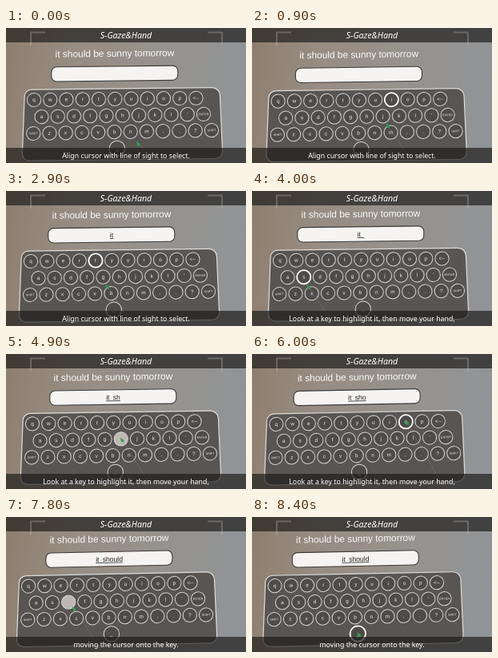
Animation, 300 px wide and 169 px high, one loop 8500 ms. Source, as an HTML page with a canvas:

```html
<!DOCTYPE html>
<html lang="en">
<head>
<meta charset="utf-8">
<title>Gaze typing</title>
<style>
  html, body { margin: 0; width: 100%; height: 100%; overflow: hidden; background: #98918a; }
  canvas { display: block; width: 100vw; height: 100vh; }
</style>
</head>
<body>
<canvas id="stage"></canvas>
<script>
const W = 300, H = 169, LOOP = 8500, STEP = 100;
const canvas = document.getElementById('stage');
const ctx = canvas.getContext('2d');
const SANS = '"Liberation Sans", Arial, sans-serif';
const CAPTION = '"Noto Sans", "Open Sans", sans-serif';

// Camera sway: time, x and y of the first key, slope
const sway = [
  [0, 35, 90, -.011], [1700, 30.7, 93, -.016], [2900, 31, 88, -.012], [4000, 35, 87, -.012],
  [6000, 30.3, 87.9, -.019], [7100, 27.6, 87, -.022], [8400, 28.5, 86.2, -.02]
];

// Typing: key, gaze start, press time
const typing = [
  ['i', 900, 1600], ['t', 2000, 2500], ['space', 3000, 3300], ['s', 3600, 4200],
  ['h', 4500, 4900], ['o', 5200, 5700], ['u', 6100, 6400], ['l', 6700, 7000],
  ['d', 7300, 7700], ['space', 8000, 8600]
];

const captions = [
  [0, 'Align cursor with line of sight to select.'],
  [3300, 'Look at a key to highlight it, then move your hand,'],
  [6400, 'moving the cursor onto the key.']
];

const keys = {};
function addRow(names, x, y, rise) {
  names.split(' ').forEach((name, i) => {
    const id = keys[name] ? name + '2' : name;
    keys[id] = { label: name, x: x + i * 20.25, y: y - i * rise };
  });
}
addRow('q w e r t y u i o p <--', 0, 0, 0);
addRow("a s d f g h j k l ' ENTER", 9.5, 21.2, .1);
addRow('SHIFT z x c v b n m , . ? SHIFT', -.8, 42, .14);
keys.space = { label: '_', x: 103.8, y: 62 };

// Cursor path in keyboard coordinates
const at = (time, name) => [time, keys[name].x + 1.2, keys[name].y + 1];
const cursorPath = [
  [0, 130, 56], [700, 136, 38], at(1500, 'i'), at(1800, 'i'), at(2400, 't'), at(2600, 't'),
  [2900, 95.5, 33], at(3300, 'space'), [3700, 50, 42], [4000, 35.5, 33.5], at(4200, 's'),
  [4500, 60, 36], at(4900, 'h'), [5300, 140, 20], at(5700, 'o'), at(6000, 'o'),
  at(6400, 'u'), [6700, 158, 34], at(7000, 'l'), at(7200, 'l'), at(7700, 'd'),
  [8000, 72, 50], at(8400, 'space')
];

function sample(track, t) {
  const next = track.findIndex(row => row[0] > t);
  if (next < 0) return track[track.length - 1].slice(1);
  const a = track[next - 1], b = track[next];
  const p = (t - a[0]) / (b[0] - a[0]);
  const eased = p * p * (3 - 2 * p);
  return a.slice(1).map((v, i) => v + (b[i + 1] - v) * eased);
}

function label(text, x, y, font, color = '#fff', align = 'center') {
  ctx.font = font;
  ctx.fillStyle = color;
  ctx.textAlign = align;
  ctx.fillText(text, x, y);
}

function shape(fill, stroke, width) {
  if (fill) { ctx.fillStyle = fill; ctx.fill(); }
  if (stroke) { ctx.strokeStyle = stroke; ctx.lineWidth = width; ctx.stroke(); }
}

function drawBackground() {
  const wall = ctx.createLinearGradient(0, 60, W, 100);
  wall.addColorStop(0, '#8f7f70');
  wall.addColorStop(.25, '#978c82');
  wall.addColorStop(.6, '#97928d');
  wall.addColorStop(1, '#909498');
  ctx.fillStyle = wall;
  ctx.fillRect(0, 0, W, H);
}

function drawField(typed) {
  label('it should be sunny tomorrow', 26.6, -53, '11.9px ' + SANS, '#fafafa', 'left');
  ctx.beginPath();
  ctx.roundRect(21.8, -41, 158, 18.3, 6.5);
  shape('#f5f4f2', '#3c3a38', 1.1);
  if (!typed) return;
  label(typed, 101, -28.6, '8.6px ' + SANS, '#222');
  const width = ctx.measureText(typed).width;
  ctx.fillRect(101 - width / 2, -27.5, width, .7);
}

function drawPanel() {
  ctx.beginPath();
  ctx.moveTo(100, -13);
  ctx.arcTo(232, -13, 236, 76, 10);
  ctx.arcTo(236, 76, -15, 76, 9);
  ctx.arcTo(-15, 76, -11.5, -13, 9);
  ctx.arcTo(-11.5, -13, 100, -13, 9);
  ctx.closePath();
  shape('#585553', '#dfddda', 1.2);
}

function drawKey(id, gazed, pressed) {
  const { label: text, x, y } = keys[id];
  ctx.beginPath();
  ctx.arc(x, y, id === 'space' ? 9.7 : 8.6, 0, Math.PI * 2);
  const bold = gazed && !pressed;
  shape(pressed ? '#bdb8b4' : '#4e4b49', bold ? '#fff' : '#d6d4d1', bold ? 1.8 : 1);
  if (pressed) return;
  const size = text.length > 3 ? 3.8 : 6.4;
  label(text, x, y + (size > 4 ? 2 : 1.3), size + 'px ' + SANS, '#f4f4f4');
}

function drawCursor(t) {
  const [x, y] = sample(cursorPath, t);
  ctx.beginPath();
  ctx.moveTo(x, y);
  ctx.lineTo(x + 12 + (76 - y) * .4, 76);
  shape(null, 'rgba(155,160,152,.45)', .6);
  ctx.beginPath();
  ctx.moveTo(x - 2.2, y - 2.8);
  ctx.lineTo(x + 2.6, y + .5);
  ctx.lineTo(x + 2, y + 3.4);
  ctx.lineTo(x - 1, y + 2.2);
  ctx.closePath();
  shape('#35a052');
}

function drawBrackets() {
  ctx.beginPath();
  for (const [x, dx] of [[31, 1], [270, -1]]) {
    ctx.moveTo(x + 18 * dx, 5.5);
    ctx.lineTo(x, 5.5);
    ctx.lineTo(x, 22);
  }
  shape(null, 'rgba(190,188,185,.33)', 2);
}

function drawBands(t) {
  ctx.fillStyle = 'rgba(28,27,26,.68)';
  ctx.fillRect(0, 0, W, 18);
  ctx.fillRect(0, 150, W, 19);
  drawBrackets();
  label('S-Gaze&Hand', 150, 12.6, 'italic 10.6px ' + CAPTION);
  const caption = captions.filter(row => row[0] <= t).pop()[1];
  label(caption, 150, 162.7, '8.8px ' + CAPTION);
}

function draw(t) {
  const [x, y, slope] = sample(sway, t);
  const current = typing.filter(row => row[1] <= t).pop();
  const pressed = current && t >= current[2] && t < current[2] + 250;
  const typed = typing.filter(row => row[2] <= t)
    .map(row => row[0] === 'space' ? '\u2002' : row[0]).join('');

  drawBackground();
  ctx.save();
  ctx.transform(1, slope, 0, 1, x, y);
  drawField(typed);
  drawPanel();
  for (const id in keys) {
    const gazed = Boolean(current) && current[0] === id;
    drawKey(id, gazed, gazed && pressed);
  }
  drawCursor(t);
  ctx.restore();
  drawBands(t);
}

function resize() {
  const ratio = window.devicePixelRatio || 1;
  canvas.width = Math.round(innerWidth * ratio);
  canvas.height = Math.round(innerHeight * ratio);
  ctx.setTransform(canvas.width / W, 0, 0, canvas.height / H, 0, 0);
}

const start = performance.now();
function tick() {
  const elapsed = (performance.now() - start) % LOOP;
  draw(Math.floor(elapsed / STEP) * STEP);
  requestAnimationFrame(tick);
}
addEventListener('resize', resize);
resize();
tick();
</script>
</body>
</html>
```
